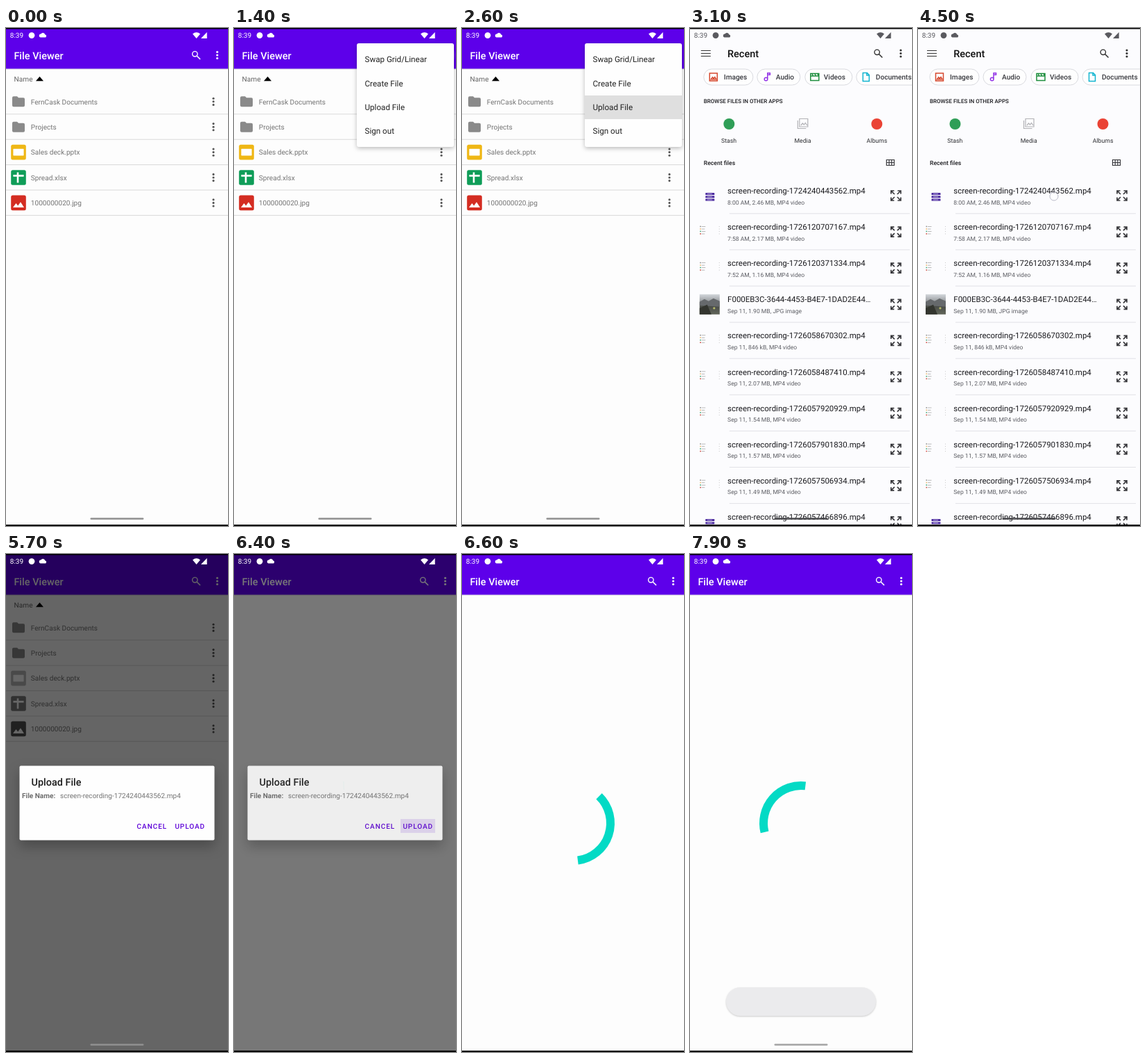
An HTML page for the animation above (8 s loop, 320 px wide and 716 px high).

```html
<!DOCTYPE html>
<html lang="en">
<head>
<meta charset="utf-8">
<title>File Viewer</title>
<style>
html, body { margin: 0; width: 100%; height: 100%; overflow: hidden; background: #fdfdfd; }
svg { display: block; width: 320px; height: 716px; font-family: Roboto, "Noto Sans", sans-serif; text-rendering: geometricPrecision; }
#menu > rect:first-child { filter: drop-shadow(0 2px 3px #0004); }
#dialog { transform-origin: 160px 358px; }
#dialog > rect { filter: drop-shadow(0 9px 9px #0004); }
#toast { filter: drop-shadow(0 1px 1px #0003); }
</style>
</head>
<body>
<svg id="stage" viewBox="0 0 320 716"></svg>
<script>
const text = (x, y, size, str, fill, attrs = '') =>
  `<text x="${x}" y="${y}" font-size="${size}" fill="${fill}" ${attrs}>${str}</text>`;
const rect = (x, y, w, h, fill, attrs = '') =>
  `<rect x="${x}" y="${y}" width="${w}" height="${h}" fill="${fill}" ${attrs}/>`;
const path = (d, fill, attrs = '') => `<path d="${d}" fill="${fill}" ${attrs}/>`;
const line = (d, color, width = 1, attrs = '') =>
  path(d, 'none', `stroke="${color}" stroke-width="${width}" ${attrs}`);
const circle = (x, y, r, fill, attrs = '') => `<circle cx="${x}" cy="${y}" r="${r}" fill="${fill}" ${attrs}/>`;
const group = (id, body) => `<g id="${id}">${body}</g>`;
const at = (x, y, body) => `<g transform="translate(${x} ${y})">${body}</g>`;
const dots = (x, y, fill, gap = 4.5) => [-gap, 0, gap].map(d => circle(x, y + d, 1.55, fill)).join('');
const search = (x, y, color) => at(x, y,
  circle(-1.7, -1.7, 3.7, 'none', `stroke="${color}" stroke-width="1.4"`) + line('M1 1L6 6', color, 1.6));
const MEDIUM = 'font-weight="500"', MIDDLE = 'text-anchor="middle"';

// ---- file list ----
const folder = 'M-9-5.5q0-2 2-2h5l2 2h7q2 0 2 2v9q0 2-2 2h-14q-2 0-2-2z';
const tile = color => rect(-10.8, -10.8, 21.6, 21.6, color, 'rx="2.5"');
const icons = {
  folder: path(folder, '#8a8a8a'),
  deck: tile('#efb715') + rect(-7.6, -4.8, 15.2, 9.6, '#fff', 'rx=".6"'),
  sheet: tile('#0f9d58') + line('M-7.6-2.6H7.6M-1-7.6V7.6', '#fff', 2.6),
  image: tile('#d42d22') + path('M-8 6.5L-3.5.5-.8 4 3-1.2 8 6.5z', '#fff')
};
const files = [['folder', 'FernCask Documents'], ['folder', 'Projects'], ['deck', 'Sales deck.pptx'],
  ['sheet', 'Spread.xlsx'], ['image', '1000000020.jpg']];
const rowY = i => 105.8 + 36.4 * i;
const fileIcons = files.map(([kind], i) => at(18, rowY(i), icons[kind])).join('');
const fileRows = files.map(([, name], i) => text(35.8, rowY(i) + 3.7, 10.1, name, '#757575')
  + dots(299, rowY(i), '#555', 4.6) + rect(0, rowY(i) + 17.5, 320, 1, '#dadada')).join('');

const viewer = rect(0, 0, 360, 716, '#fdfdfd')
  + group('list', text(11.6, 77, 10.1, 'Name', '#666') + path('M43 76.3L48.5 69.8 54 76.3z', '#000')
    + fileRows + group('icons', fileIcons))
  + rect(0, 58, 360, 1.5, '#d8d4e0') + rect(0, 0, 360, 58.5, '#5d00ea')
  + text(11.4, 44.8, 14.5, 'File Viewer', '#fff', MEDIUM)
  + search(274, 39, '#fff') + dots(304.5, 39, '#fff');

const menu = rect(177, 22, 140, 149, '#fefefe', 'rx="3"')
  + rect(177, 97, 140, 34, '#000', 'id="pressed"')
  + ['Swap Grid/Linear', 'Create File', 'Upload File', 'Sign out']
    .map((s, i) => text(188.5, 49.2 + 34.3 * i, 11.65, s, '#222')).join('');

// ---- file picker ----
const chips = [
  [17, 71, 46, 'Images', '#d6492f', 'M-5.5-5.5h11v11h-11zM-3.5 3.2l2.2-3 1.6 2L2 0l2 3.2z'],
  [94, 62, 121, 'Audio', '#9334e6', 'M1 2.7V-5.8H4.5V-3.3H1M1 3a2.3 2.3 0 1 1-4.6 0a2.3 2.3 0 1 1 4.6 0z'],
  [163, 68, 190, 'Videos', '#1e8e3e', 'M-6-5H6V5H-6zM-6-1.5H6M-4-5l1.6 3.5M0-5l1.6 3.5M4-5l1.6 3.5'],
  [237, 94, 265, 'Documents', '#12b5d0', 'M-4.5-6H1.5L4.5-3V6h-9zM1-6v3.5h3.5']
].map(([x, w, tx, name, color, d]) =>
  rect(x, 59, w, 23, '#fefefe', 'rx="11.5" stroke="#d9dadf"')
  + at(x + 14, 70.5, line(d, color, 1.5)) + text(tx, 74, 10.1, name, '#3a3b40', MEDIUM)).join('');

const apps = circle(53.5, 138, 8, '#2f9e57')
  + line('M155 130.5h12v11.5h-12zM157 140l2.5-3 2 2 2-2.5 2.5 3.5M152.5 133v11.5h12', '#b2b2b6', 1.2)
  + circle(266.5, 138, 8, '#ea4335')
  + [[53.3, 'Stash'], [159.7, 'Media'], [266.6, 'Albums']]
    .map(([x, s]) => text(x, 165, 8.7, s, '#2c2d31', MIDDLE)).join('');

let corners = '';
for (const x of [-1, 1]) for (const y of [-1, 1])
  corners += `M${7 * x} ${2.5 * y}V${7 * y}H${2.5 * x}M${7 * x} ${7 * y}L${2 * x} ${2 * y}`;

const bars = [0, 4.2, 8.4].map(y => rect(8.5, 10.6 + y, 13, 3, '#4b2a9e', 'rx=".6"')
  + rect(11, 11.7 + y, 7, .8, '#cfc4ee')).join('');
const miniList = ['#8f8f8f', '#efb768', '#3faa78', '#d0483c'].map((c, i) =>
  rect(.5, 6 + 3.5 * i, 1.6, 1.6, c) + rect(3, 6.5 + 3.5 * i, 5.5 - i % 2, .8, '#a8a8a8')
  + rect(28, 6.5 + 3.5 * i, .8, .8, '#aaa')).join('');
const landscape = rect(0, 0, 29, 29, 'url(#land)') + path('M0 11L7 7 13 10 20 6 29 10V18L0 16z', '#66696c')
  + path('M0 20L11 15 17 29H0z', '#33352f') + circle(21, 20, 1.6, '#b4b86a');

const rows = [
  ['1724240443562', '8:00 AM, 2.46 MB'], ['1726120707167', '7:58 AM, 2.17 MB'],
  ['1726120371334', '7:52 AM, 1.16 MB'], ['', 'Sep 11, 1.90 MB'],
  ['1726058670302', 'Sep 11, 846 kB'], ['1726058487410', 'Sep 11, 2.07 MB'],
  ['1726057920929', 'Sep 11, 1.54 MB'], ['1726057901830', 'Sep 11, 1.57 MB'],
  ['1726057506934', 'Sep 11, 1.49 MB'], ['1726057466896', 'Sep 11, 1.42 MB']
].map(([id, info], i) => at(0, 52.1 * i,
  text(51.3, 238, 11.48, id ? `screen-recording-${id}.mp4` : 'F000EB3C-3644-4453-B4E7-1DAD2E44…', '#1b1b1f')
  + text(51.3, 253.6, 8.55, info + (id ? ', MP4 video' : ', JPG image'), '#5c5d63')
  + at(11, 226.5, !id ? landscape : i % 9 ? miniList : bars)
  + at(294, 241, line(corners, '#38383c', 1.7))
  + rect(54, 266.3, 260, 1, '#e2e2e7'))).join('');

const picker = rect(-40, 0, 400, 716, '#fcfcfe')
  + line('M13 32.5H27M13 36.5H27M13 40.5H27', '#333', 1.2)
  + text(51.2, 42, 14.5, 'Recent', '#111', MEDIUM) + search(268.5, 36.5, '#333') + dots(301, 36.5, '#333')
  + chips + text(17, 107.8, 8, 'BROWSE FILES IN OTHER APPS', '#1b1b1f', MEDIUM) + apps
  + text(17, 196.6, 8.65, 'Recent files', '#1b1b1f', MEDIUM)
  + line('M280.5 189.5h11v8h-11zM280.5 193.5h11M284.2 189.5v8M287.9 189.5v8', '#38383c', 1.2)
  + rect(0, 215, 320, 51.5, '#000', 'id="rowPressed"') + rows;

// ---- dialog, toast and system bars ----
const dialog = rect(19.5, 304.5, 281, 107, '#fefefe', 'rx="2"')
  + text(36.6, 333, 14.4, 'Upload File', '#1c1c1c', MEDIUM)
  + text(23, 351.2, 10.05, 'File Name:', '#6e6e6e', 'font-weight="700"')
  + text(78, 351.2, 10.05, 'screen-recording-1724240443562.mp4', '#757575')
  + path('M240 381h50v20h-50z', '#5d00d8', 'id="uploadPressed"')
  + text(188.6, 395, 10.05, 'CANCEL', '#5d00d8', MEDIUM + ' letter-spacing=".9"')
  + text(243.4, 395, 10.05, 'UPLOAD', '#5d00d8', MEDIUM + ' letter-spacing=".9"');

const status = text(5.8, 14.3, 10, '8:39', 'currentColor') + circle(37, 10.6, 4.4, 'currentColor')
  + path('M49.5 13.5h6.5a2 2 0 0 0 .3-4 3.3 3.3 0 0 0-6-.9 2.5 2.5 0 0 0-.8 4.9z', 'currentColor')
  + path('M269 8.5Q274.5 4 280 8.5L274.5 15z', 'currentColor') + path('M281 15h8.7V6z', 'currentColor');

const $ = id => document.getElementById(id);
$('stage').innerHTML = `<defs><linearGradient id="land" x2="0" y2="1"><stop stop-color="#d3d7dc"/>
  <stop offset=".35" stop-color="#9a9da0"/><stop offset=".6" stop-color="#4a4d48"/><stop offset="1" stop-color="#62665a"/></linearGradient></defs>`
  + group('viewer', viewer) + line('', '#03dac5', 12, 'id="spinner"')
  + circle(304.5, 39, 14.6, '#fff', 'id="ripple"') + group('menu', menu) + group('picker', picker)
  + rect(0, 0, 320, 716, '#000', 'id="dim"') + group('dialog', dialog)
  + rect(52, 623, 216, 41, '#ebebed', 'rx="20.5" id="toast"')
  + group('status', status) + rect(121.5, 704.2, 77, 2.6, 'currentColor', 'rx="1.3" id="handle"')
  + circle(0, 0, 6, '#fff', 'fill-opacity=".6" stroke="#aab" stroke-opacity=".8" id="touch"')
  + rect(0, 0, 320, 1.5, '#000') + rect(0, 714, 320, 2, '#000');

// ---- motion ----
const ramp = (t, from, length) => Math.min(1, Math.max(0, (t - from) / length));
const show = (id, alpha, x = 0) => {
  const el = $(id);
  el.style.display = alpha > 0 ? '' : 'none';
  el.style.opacity = alpha;
  if (x || el.hasAttribute('transform')) el.setAttribute('transform', `translate(${x} 0)`);
};

// Height of a cubic curve, given by four points, at position x
function curve(x, xs, ys) {
  const mix = (p, u, v = 1 - u) => p[0] * v ** 3 + 3 * p[1] * u * v * v + 3 * p[2] * u * u * v + p[3] * u ** 3;
  let lo = 0, hi = 1;
  for (let i = 0; i < 24; i++) {
    const u = (lo + hi) / 2;
    if (mix(xs, u) < x) lo = u; else hi = u;
  }
  return mix(ys, lo);
}
const grow = x => x <= 0 ? 0 : x >= .5 ? 1 : curve(x, [0, .2, .1, .5], [0, 0, 1, 1]);
// Screen change: quick start, very slow end
const slide = x => x <= 0 ? 0 : x >= 1 ? 1
  : x < 1 / 6 ? curve(x, [0, .05, .1333, 1 / 6], [0, 0, .06, .4])
  : curve(x, [1 / 6, .2083, .25, 1], [.4, .82, 1, 1]);

function spin(t) {
  const ms = 227 + (t - 6600) * 1.0125, p = ms % 1333 / 1333;
  const base = -98 + ms * .162 + 90 * p;
  const from = base + 270 * grow(p - .5), to = base + 270 * grow(p);
  const point = a => `${160 + 54 * Math.cos(a * Math.PI / 180)} ${387 + 54 * Math.sin(a * Math.PI / 180)}`;
  $('spinner').setAttribute('d', `M${point(from)}A54 54 0 ${+(to - from > 180)} 1 ${point(to)}`);
}

const taps = [[1000, 304.5, 39], [2400, 218, 114], [4500, 196, 242], [6100, 265, 391]];
const press = (t, start) => ramp(t, start, 150) * (1 - ramp(t, start + 280, 200));
const OPEN = 2920, CLOSE = 4950, ASK = 5050, SEND = 6380;

function draw(t) {
  const open = slide((t - OPEN) / 450), close = slide((t - CLOSE) / 450);
  const asked = ramp(t, ASK, 220), sent = ramp(t, SEND, 170);
  const dim = asked * (1 - sent);
  const loading = t >= 6400, picking = t >= 3000 && t < 5000;

  show('viewer', 1, -32 * (open - close));
  show('list', loading ? 0 : 1);
  $('icons').style.filter = dim ? `grayscale(${dim})` : '';

  const reveal = grow(ramp(t, 1200, 200) / 2);
  show('ripple', .22 * press(t, 1000));
  show('menu', ramp(t, 1200, 100) * (1 - ramp(t, 2680, 220)));
  $('menu').style.clipPath = reveal < 1
    ? `inset(-6px -6px ${60 * (1 - reveal)}% ${60 * (1 - reveal)}%)` : '';
  show('pressed', .12 * press(t, 2400));

  show('picker', ramp(t, OPEN + 50, 83) * (1 - ramp(t, CLOSE + 35, 83)), 32 * (1 - open + close));
  show('rowPressed', .09 * press(t, 4500));

  show('dim', .6 * dim);
  show('dialog', dim);
  $('dialog').style.transform = `scale(${.9 + .1 * (1 - (1 - asked) ** 3)})`;
  show('uploadPressed', .14 * press(t, 6100));

  show('spinner', loading ? 1 : 0);
  if (loading) spin(t);
  show('toast', t >= 7900 ? 1 : 0);
  $('status').style.color = picking ? '#5a5a5f' : '#fff';
  $('handle').style.color = picking ? '#4a4a4e' : t >= 7900 ? '#a4a4a4' : '#909090';
  show('handle', loading && t < 7900 ? 0 : 1);

  const tap = taps.find(([start]) => t >= start && t < start + 200);
  show('touch', tap ? 1 : 0);
  if (tap) $('touch').setAttribute('transform', `translate(${tap[1]} ${tap[2]})`);
}

const start = performance.now();
function tick() {
  draw(Math.floor((performance.now() - start) % 8000 / 100) * 100);
  requestAnimationFrame(tick);
}
tick();
</script>
</body>
</html>
```
